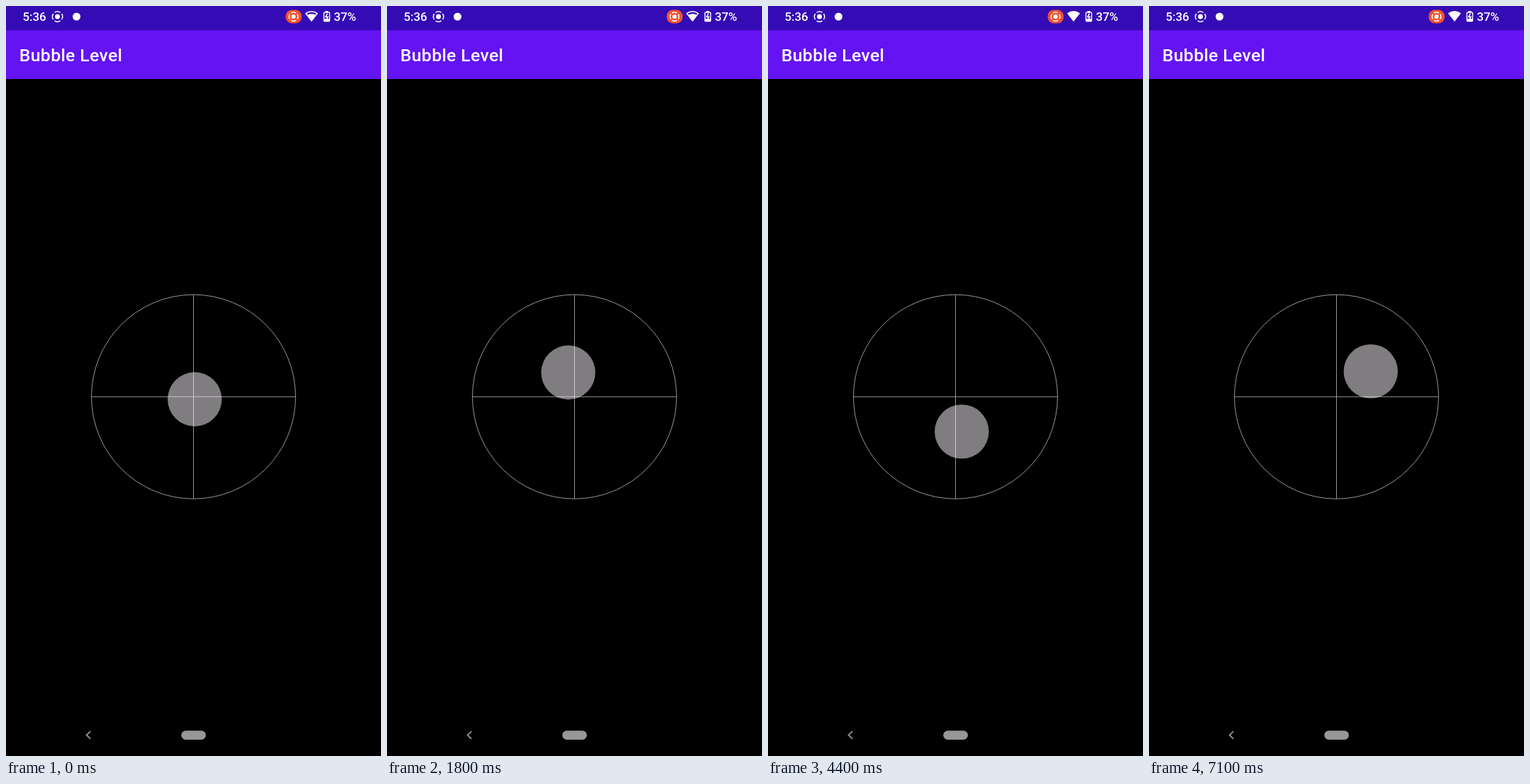
An HTML page with a canvas for the animation above (7200 ms loop, 529 px wide and 1058 px high).

```html
<!DOCTYPE html>
<html lang="en">
<head>
<meta charset="utf-8">
<title>Bubble Level</title>
<style>
  html, body { margin: 0; width: 100%; height: 100%; overflow: hidden; background: #000; }
  canvas { display: block; width: 529px; height: 1058px; }
</style>
</head>
<body>
<canvas id="stage" width="529" height="1058"></canvas>
<script>
const ctx = document.getElementById('stage').getContext('2d');
const W = 529, H = 1058, LOOP = 7200, STEP = 100;
const BAR = '#350bb5', APP = '#6413f2', WHITE = '#fff';
const STATUS_H = 34.3, APP_END = 102.9;
const DIAL = { x: 264.5, y: 551.2, r: 144 };

// key poses of the bubble: time, x, y
const POSES = [
  [0, 266.2, 554.8], [1200, 229, 550], [2400, 287, 489.4], [3200, 277.2, 531],
  [4400, 273.3, 600.4], [5500, 251.5, 580], [7100, 312.8, 515.4]
];

function slope(i, k) {
  const a = POSES[Math.max(i - 1, 0)], b = POSES[Math.min(i + 1, POSES.length - 1)];
  return (b[k] - a[k]) / (b[0] - a[0]);
}

// smooth curve through the poses
function bubbleAt(t) {
  let i = 0;
  while (i < POSES.length - 2 && t >= POSES[i + 1][0]) i++;
  const a = POSES[i], b = POSES[i + 1], span = b[0] - a[0];
  const u = Math.min(1, (t - a[0]) / span), v = 1 - u;
  return [1, 2].map(k =>
    v * v * (1 + 2 * u) * a[k] + u * u * (3 - 2 * u) * b[k] +
    span * u * v * (v * slope(i, k) - u * slope(i + 1, k)));
}

// three of every nineteen steps hold the previous picture
function heldStep(n) {
  return (n * 3 + 9) % 19 < 3 ? n - 1 : n;
}

function disc(x, y, r, color) {
  ctx.fillStyle = color;
  ctx.beginPath();
  ctx.arc(x, y, r, 0, Math.PI * 2);
  ctx.fill();
}

function arc(x, y, r, from, to, color, width) {
  ctx.strokeStyle = color;
  ctx.lineWidth = width;
  ctx.beginPath();
  ctx.arc(x, y, r, from, to);
  ctx.stroke();
}

function box(x, y, w, h, r, color) {
  ctx.fillStyle = color;
  ctx.beginPath();
  ctx.roundRect(x, y, w, h, r);
  ctx.fill();
}

function line(color, width, ...pts) {
  ctx.strokeStyle = color;
  ctx.lineWidth = width;
  ctx.beginPath();
  pts.forEach(p => ctx.lineTo(...p));
  ctx.stroke();
}

function label(text, x, y, size, spacing = 0) {
  ctx.font = `500 ${size}px Roboto, sans-serif`;
  ctx.letterSpacing = spacing + 'px';
  ctx.fillStyle = WHITE;
  ctx.fillText(text, x, y);
}

function recordIcon(x, y, r) {
  disc(x, y, r * 0.49, WHITE);
  for (let q = 0; q < 4; q++) {
    const mid = q * Math.PI / 2;
    arc(x, y, r, mid - 0.6, mid + 0.6, WHITE, 1.5);
  }
}

// signal fan standing on its tip
function fan(x, y, size) {
  const side = size * 0.61, shoulder = y - size * 0.78;
  ctx.beginPath();
  ctx.moveTo(x, y);
  ctx.lineTo(x - side, shoulder);
  ctx.quadraticCurveTo(x, y - size * 1.22, x + side, shoulder);
  ctx.closePath();
}

function wifi(x, y, full) {
  ctx.fillStyle = ctx.strokeStyle = WHITE;
  ctx.save();
  fan(x, y, 15);
  if (full) {
    ctx.fill();
  } else {
    ctx.clip();
    ctx.lineWidth = 3.2;
    ctx.stroke();
    fan(x, y, 11);
    ctx.fill();
  }
  ctx.restore();
}

function battery(x, y) {
  box(x - 2.1, y - 7.6, 4.2, 3, 0.5, WHITE);
  box(x - 4.7, y - 6.2, 9.4, 13.8, 1.4, WHITE);
  box(x - 3.3, y - 4.8, 6.6, 8.2, 0.4, BAR);
  line(WHITE, 1.6, [x + 0.9, y - 4], [x - 1.5, y + 0.6], [x + 1.5, y + 0.6], [x - 0.9, y + 5]);
}

function statusBar(t) {
  label('5:36', 23.4, 20.6, 16.9);
  recordIcon(72.6, 15, 7.1);
  disc(99.5, 15, 5.5, WHITE);
  box(394.6, 5.4, 22.4, 19, 8.5, '#f1512f');
  recordIcon(405.6, 15, 6.2);
  wifi(431, 21.9, t >= 3000);
  battery(452.5, 14.6);
  label('37%', 462.4, 20.6, 16.9);
}

function bars() {
  box(0, 0, W, APP_END, 0, APP);
  box(0, 0, W, STATUS_H, 0, BAR);
  label('Bubble Level', 18.8, 78, 24.8, 0.32);
}

function dial(t) {
  const { x, y, r } = DIAL, gray = '#989698';
  line(gray, 1, [x - r, y], [x + r, y]);
  line(gray, 1, [x, y - r], [x, y + r]);
  arc(x, y, r, 0, Math.PI * 2, gray, 1);
  disc(...bubbleAt(t), 38.2, 'rgba(255, 249, 255, 0.5)');
}

function navBar() {
  line('#949294', 1.8, [119.2, 1023.2], [113.6, 1028.5], [119.2, 1033.8]);
  box(247.2, 1022.3, 34.8, 12.6, 6.3, '#999699');
}

function draw(t) {
  box(0, 0, W, H, 0, '#000');
  bars();
  statusBar(t);
  dial(t);
  navBar();
}

const start = performance.now();
function tick() {
  const t = (performance.now() - start) % LOOP;
  draw(heldStep(Math.floor(t / STEP)) * STEP);
  requestAnimationFrame(tick);
}
tick();
</script>
</body>
</html>
```
